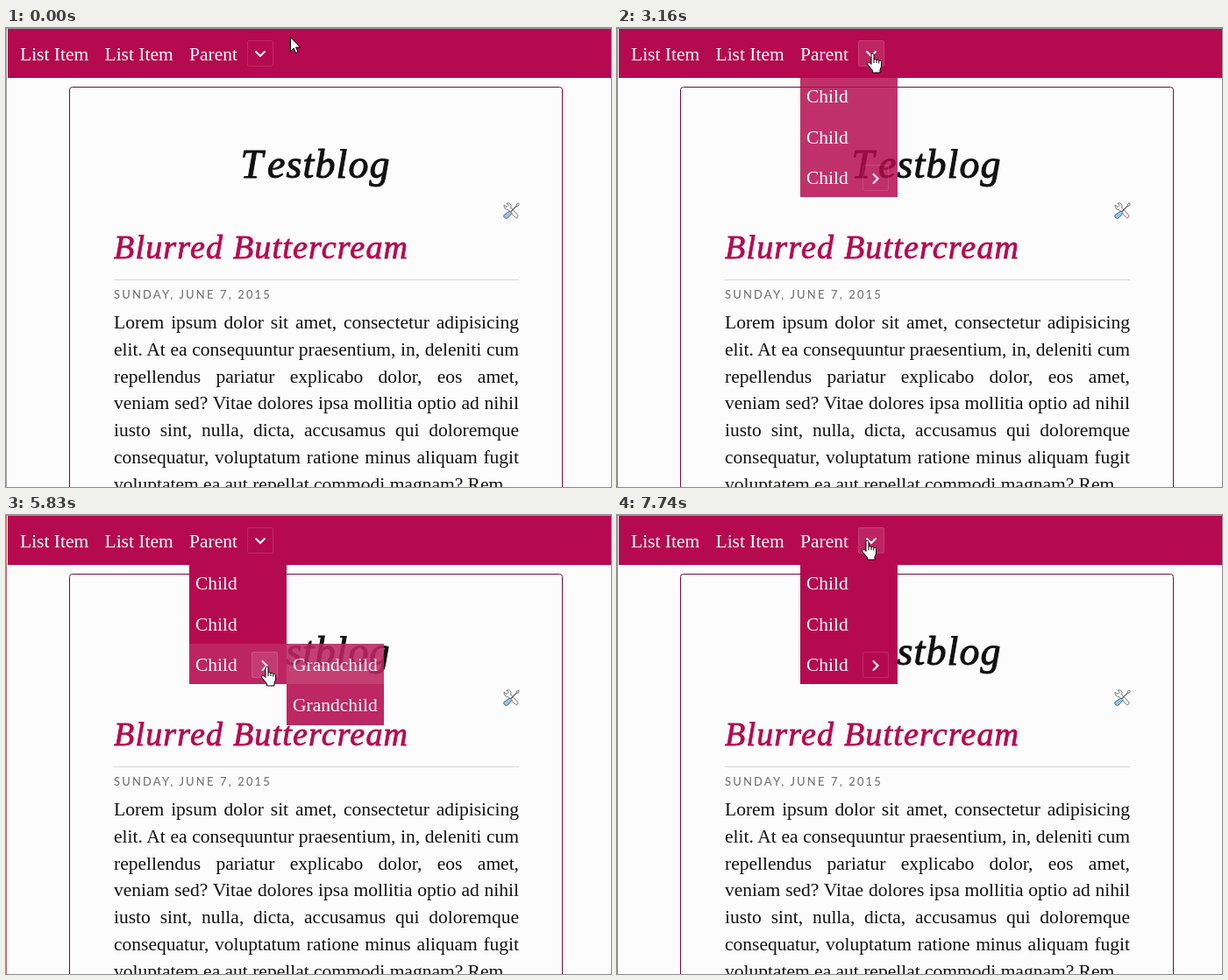
An HTML page that plays this animation: 690 by 524 pixels, repeating every 8000 ms.

```html
<!DOCTYPE html>
<html lang="en">
<head>
<meta charset="utf-8">
<title>Dropdown menu</title>
<style>
  html, body { margin: 0; width: 100%; height: 100%; overflow: hidden; background: #fcfcfc; }
  body { position: relative; font: 21.5px "Liberation Serif", serif; color: #111; }
  svg { position: absolute; left: 0; top: 0; }
  p { position: absolute; left: 123px; top: 321px; width: 462px; margin: 0; line-height: 30.8px; }
  p span { display: block; white-space: nowrap; text-align: justify; text-align-last: justify; }
  p span:last-child { text-align-last: left; }
  .link { fill: #fff; }
  .bar { fill: #b50a4f; }
  .lit { fill: #fff; fill-opacity: .11; }
  .box { fill: none; stroke: #fff; stroke-opacity: .12; }
  .chev { fill: none; stroke: #fff; stroke-width: 2.1; stroke-linecap: round; }
  .head { font-style: italic; stroke-linejoin: round; }
  .date { font: 500 13px Lato, sans-serif; letter-spacing: 2.15px; fill: #757575; }
  .cur { fill: #fff; stroke: #000; stroke-linejoin: round; }
</style>
</head>
<body>
<p>
  <span>Lorem ipsum dolor sit amet, consectetur adipisicing</span>
  <span>elit. At ea consequuntur praesentium, in, deleniti cum</span>
  <span>repellendus pariatur explicabo dolor, eos amet,</span>
  <span>veniam sed? Vitae dolores ipsa mollitia optio ad nihil</span>
  <span>iusto sint, nulla, dicta, accusamus qui doloremque</span>
  <span>consequatur, voluptatum ratione minus aliquam fugit</span>
  <span>voluptatem ea aut repellat commodi magnam? Rem</span>
</p>
<svg width="690" height="524" viewBox="0 0 690 524">
  <rect class="bar" x="2" y="1" width="688" height="56"/>
  <rect width="690" height="1" fill="#999"/>
  <rect id="edge" width="1" height="524"/>
  <rect x="72.5" y="67.5" width="562" height="480" rx="3" fill="none" stroke="#7a0a3a"/>

  <g class="link">
    <text x="16" y="37">List Item</text>
    <text x="112.5" y="37">List Item</text>
    <text x="209" y="37">Parent</text>
  </g>
  <rect class="lit" id="toggle" x="275" y="14" width="30" height="30" rx="2"/>
  <rect class="box" x="275.5" y="14.5" width="29" height="29" rx="2"/>
  <path class="chev" d="M285 27l5 5 5-5"/>

  <text class="head" x="267.5" y="171" font-size="46" letter-spacing="1.1" fill="#111" stroke="#111"><tspan letter-spacing="5">T</tspan>estblog</text>
  <text class="head" x="123" y="263" font-size="38" letter-spacing="1.2" fill="#b50a4f" stroke="#b50a4f" stroke-width=".8">Blurred Buttercream</text>
  <rect x="123" y="287" width="462" height="1" fill="#d8d8d8"/>
  <text class="date" x="123" y="309">SUNDAY, JUNE 7, 2015</text>

  <g transform="translate(567 199)" stroke-linejoin="round">
    <path d="M1 3l3 2.5 2-2L4 1q4-1 5 2.5L8.7 6l8 8.5q1 2-.7 3t-2.500-.5l-8-8.500Q1 8.500 1 3z" fill="#f4f4f4" stroke="#777"/>
    <path d="M8.500 10.500L15 4l.5-2 2-1 .8 1L17 4.200l-2 .6L9 11z" fill="#eee" stroke="#555" stroke-width=".8"/>
    <path d="M7.500 10l2.500 2.500L5 18q-2 1-3.500-.5T1 14.500z" fill="#9cc3e8" stroke="#3f6d9c"/>
  </g>

  <g id="menu">
    <rect class="bar" x="209" y="57" width="111" height="136"/>
    <rect class="lit" id="row1" x="209" y="54" width="111" height="46"/>
    <rect class="lit" id="row2" x="209" y="100" width="111" height="47"/>
    <rect class="lit" id="row3" x="209" y="147" width="111" height="46"/>
    <g class="link">
      <text x="216" y="85">Child</text>
      <text x="216" y="132">Child</text>
      <text x="216" y="178">Child</text>
    </g>
    <rect class="lit" id="subToggle" x="280" y="156" width="30" height="30" rx="2"/>
    <rect class="box" x="280.5" y="156.5" width="29" height="29" rx="2"/>
    <path class="chev" d="M292.500 167l5 5-5 5"/>
  </g>
  <g id="submenu">
    <rect class="bar" x="320" y="147" width="111" height="93"/>
    <rect class="lit" id="subRow" x="320" y="147" width="111" height="46"/>
    <g class="link">
      <text x="327" y="178">Grandchild</text>
      <text x="327" y="224">Grandchild</text>
    </g>
  </g>

  <g id="cursor" class="cur">
    <path id="arrow" d="M.5.5v16l3.600-3.500 2.400 5.500 2.500-1-2.400-5.400h5z"/>
    <g id="hand" transform="translate(-6 -2)">
      <path d="M5 2.500a1.500 1.500 0 0 1 3 0V8q1.700-1 3 .5 1.600-.7 2.700.7 2-.4 2.800 1.300V15q0 2-1.500 4.500V23H6.500v-2.500L1 14q-1-2 .5-2.700T5 13.500z"/>
      <path d="M8 8v4M11 8.500V12M13.700 9.200v3.300" fill="none"/>
    </g>
  </g>
</svg>
<script>
const LOOP = 8000, HOVER = 100;
const OPEN = 2860, SUB_OPEN = 5480, SUB_CLOSE = 7050;
const $ = id => document.getElementById(id);
const clamp = v => Math.min(1, Math.max(0, v));
const linear = p => p;
const easeIn = p => p * p;
const easeOut = p => 1 - (1 - p) ** 3;

const moves = [
  { from: 0, to: 430, x: 291, y: 30, ease: linear },
  { from: 3520, to: 4340, x: 285, y: 106, ease: easeOut },
  { from: 4340, to: 5170, x: 297, y: 174, ease: linear },
  { from: 6290, to: 6800, x: 370, y: 158, ease: easeIn },
  { from: 7050, to: 7460, x: 279, y: 31, ease: linear },
  { from: 7560, to: 7740, x: 285, y: 30, ease: linear }
];

function pointer(t) {
  let x = 324, y = 10;
  for (const m of moves) {
    const p = m.ease(clamp((t - m.from) / (m.to - m.from)));
    x += (m.x - x) * p;
    y += (m.y - y) * p;
  }
  return { x: Math.round(x), y: Math.round(y) };
}

const fade = (t, from, length) => clamp((t - from) / length);

function over(id, t) {
  const { x, y } = pointer(t), b = $(id).getBBox();
  return x >= b.x && x < b.x + b.width && y >= b.y && y < b.y + b.height;
}

const subShown = t => t > SUB_OPEN && t < SUB_CLOSE;
const tests = {
  toggle: t => over('toggle', t),
  row1: t => t > OPEN && over('row1', t),
  row2: t => t > OPEN && over('row2', t),
  row3: t => over('row3', t) || subShown(t) && over('subRow', t),
  subToggle: t => over('subToggle', t)
};

// A hover highlight is the share of the last HOVER ms spent over the link.
function glow(test, t) {
  const n = 10;
  let hits = 0;
  for (let i = 0; i < n; i++) if (test(t - i * HOVER / n)) hits++;
  return hits / n;
}

function draw(t) {
  for (const id in tests) $(id).style.opacity = glow(tests[id], t);
  $('menu').style.opacity = fade(t, OPEN, 360);
  $('submenu').style.opacity = fade(t, SUB_OPEN, 400) - fade(t, SUB_CLOSE, 350);

  const { x, y } = pointer(t);
  const inGap = x === 319;
  const hand = !inGap && Object.values(tests).some(test => test(t));
  $('cursor').setAttribute('transform', `translate(${x} ${y})`);
  $('hand').style.display = hand ? '' : 'none';
  $('arrow').style.display = hand ? 'none' : '';
  $('edge').setAttribute('fill', t < 2740 ? '#a0a0a0' : '#c66a6a');
}

const start = performance.now();
function tick() {
  draw((performance.now() - start) % LOOP);
  requestAnimationFrame(tick);
}
tick();
</script>
</body>
</html>
```
